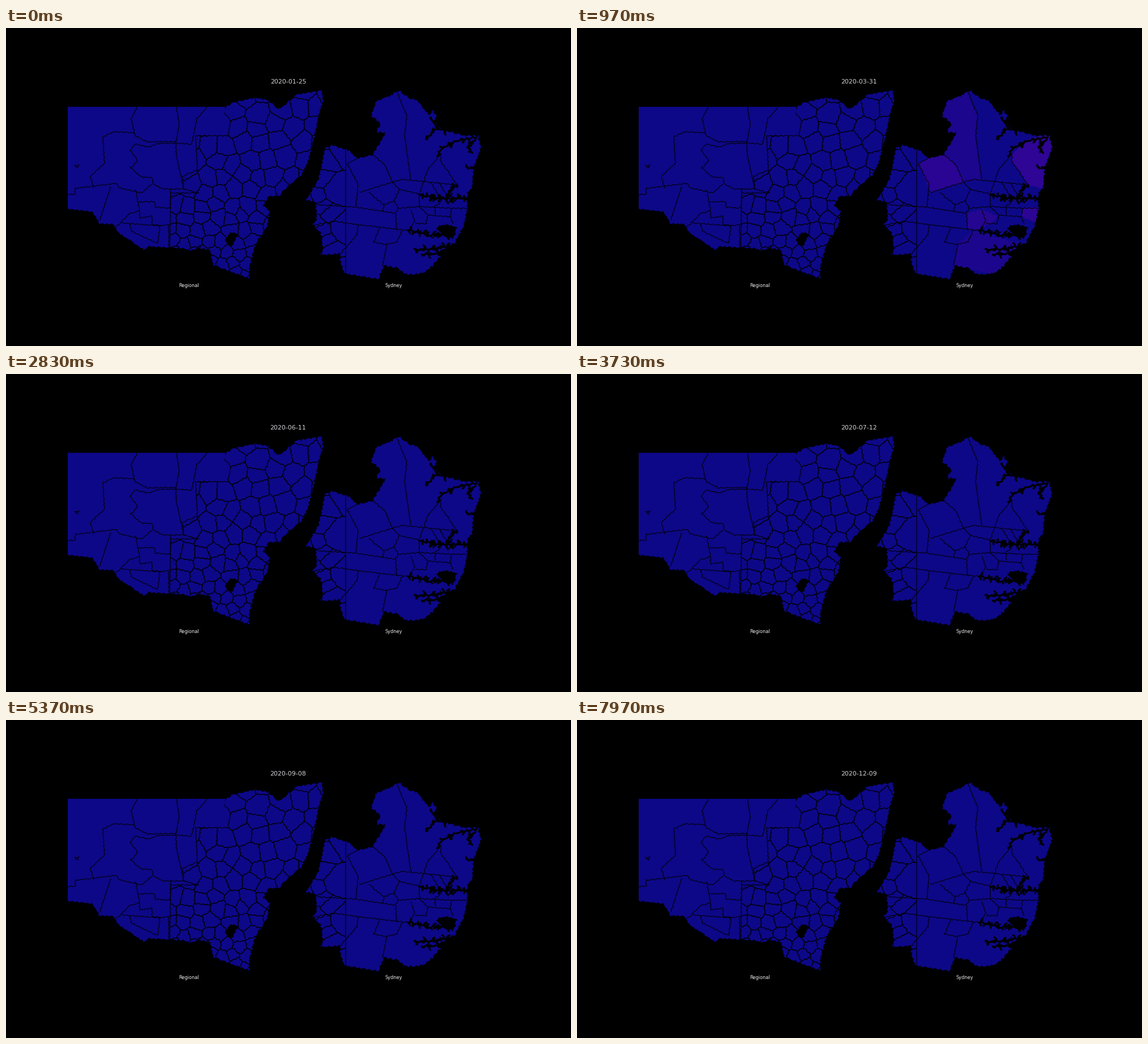
A matplotlib script for the animation above (8000 ms loop, 998 by 561 pixels).

```python
import numpy as np
import matplotlib.pyplot as plt
from matplotlib.animation import FuncAnimation
from matplotlib.collections import LineCollection
from matplotlib.patches import Polygon

W, H, DPI = 998, 561, 128
FRAMES, LOOP_MS = 240, 8000
PX = 72 / DPI
plasma = plt.colormaps["plasma"]
rng = np.random.default_rng(7)

fig = plt.figure(figsize=(W / DPI, H / DPI), dpi=DPI, facecolor="black")
ax = fig.add_axes([0, 0, 1, 1])
ax.set(xlim=(0, W), ylim=(H, 0))
ax.axis("off")


def points(coords):
    return np.array(coords, float).reshape(-1, 2)


def wobble(p, amp):
    """Shift points by a fixed ripple, so shared edges stay shared."""
    x, y = p.T
    dx = np.sin(0.8 * y + 2 * np.sin(0.23 * x)) + 0.6 * np.sin(1.7 * y + x)
    dy = np.sin(0.7 * x + 2 * np.sin(0.29 * y)) + 0.6 * np.sin(1.9 * x - y)
    return p + amp * np.column_stack([dx, dy])


def rough(pts, amp=0.7):
    """Roughen a polyline, leaving long axis-aligned edges straight."""
    out = []
    for a, b in zip(pts[:-1], pts[1:]):
        size = np.hypot(*(b - a))
        t = np.linspace(0, 1, int(size / 2) + 2)[:, None]
        seg = a + (b - a) * t
        straight = size > 100 and 0 in b - a
        out.append(seg if straight else wobble(seg, amp))
    return np.vstack(out)


def close(pts):
    return np.vstack([pts, pts[:1]])


def area(*coords, color=plasma(0.0), amp=0.9, z=1):
    shape = rough(close(points(coords)), amp)
    return ax.add_patch(Polygon(shape, fc=color, ec="none", zorder=z))


def strokes(lines, width=1.05, z=3):
    return ax.add_collection(LineCollection(lines, colors="black", zorder=z,
                                            linewidths=width * PX))


borders = []


def border(*coords):
    borders.append(rough(points(coords)))


def inlet(spurs, reach, *coords):
    """Black waterway with ragged side arms."""
    spine = rough(points(coords), 1.3)
    lines = [spine]
    for p in rng.choice(spine, spurs):
        side = reach * rng.choice([-1, 1])
        end = p + [rng.normal(0, reach / 2), side * rng.uniform(0.5, 1.2)]
        lines.append(rough(np.array([p, end]), 1.2))
    strokes(lines, 3, 4)


def voronoi(seeds):
    """Cell of each seed: a box cut by the bisector to every near neighbour."""
    for s in seeds:
        cell = s + 60 * points([-1, -1, 1, -1, 1, 1, -1, 1])
        for q in seeds:
            n = q - s
            if not 0 < np.hypot(*n) < 110:
                continue
            d = (cell - (s + q) / 2) @ n
            cut = []
            for i, a in enumerate(cell):
                j = (i + 1) % len(cell)
                if d[i] <= 0:
                    cut.append(a)
                if d[i] * d[j] < 0:
                    cut.append(a + (cell[j] - a) * d[i] / (d[i] - d[j]))
            cell = np.array(cut)
        yield cell


# ---- Left map
left = area(
    109, 139, 389, 139, 403, 131, 440, 123, 462, 127, 482, 143, 505, 126, 512, 118,
    558, 110, 560, 128, 553, 152, 541, 208, 533, 236, 522, 259, 490, 286, 484, 296,
    463, 297, 454, 314, 466, 323, 461, 350, 440, 384, 430, 420, 430, 442, 366, 418,
    361, 392, 340, 388, 326, 393, 315, 389, 251, 385, 243, 391, 225, 378, 198, 361,
    190, 346, 165, 345, 152, 324, 109, 319)
area(397, 360, 409, 363, 401, 382, 395, 386, 387, 375, color="black", z=4)

border(232, 139, 221, 160, 228, 190, 250, 201, 300, 200)
border(228, 185, 190, 183, 171, 192, 174, 238, 149, 262, 155, 283)
border(300, 203, 268, 204, 252, 210, 228, 205, 219, 215, 233, 234, 220, 247, 240, 263,
       258, 264, 260, 275, 277, 284, 314, 284, 301, 225, 300, 203)
border(301, 139, 306, 170, 300, 203, 328, 205, 337, 160, 356, 139)
border(109, 294, 122, 293, 122, 283, 195, 274, 200, 282, 240, 291, 258, 275)
border(185, 280, 166, 338)
border(229, 286, 236, 322, 218, 328, 195, 350)
border(236, 322, 236, 335, 258, 332, 258, 347, 273, 348)
border(234, 307, 262, 306, 264, 316, 290, 318, 291, 284)
border(205, 344, 272, 349, 268, 380, 222, 359, 218, 345)
border(272, 349, 287, 347, 288, 386)
border(121, 243, 129, 242, 126, 247, 121, 243)

# Small districts of the east: cells shrink towards the south.
seeds, y = [], 112
while y < 450:
    step = 39 - 0.06 * (y - 112)
    row = np.arange(270 + rng.uniform(0, step), 590, step)
    seeds += [(x, y) + rng.uniform(-0.33, 0.33, 2) * step for x in row]
    y += step * 0.85
east = points([389, 100, 600, 100, 600, 450, 288, 450, 291, 291, 340, 291, 314, 284,
               312, 262, 338, 250, 335, 190, 392, 190, 397, 163, 386, 150])
cells = strokes([rough(close(c)) for c in voronoi(np.array(seeds))])
zone = Polygon(rough(east), fc="none", ec="none")
ax.add_patch(zone)
cells.set_clip_path(zone)
borders.append(rough(east))

# ---- Right map
right = area(
    693, 110, 712, 124, 726, 128, 748, 154, 754, 146, 763, 160, 758, 165, 769, 179,
    808, 190, 834, 190, 839, 210, 826, 246, 823, 283, 815, 290, 815, 318, 808, 350,
    792, 380, 757, 398, 768, 403, 748, 425, 735, 433, 708, 435, 690, 423, 668, 419,
    658, 443, 598, 433, 590, 410, 591, 398, 555, 401, 560, 390, 555, 360, 541, 347,
    549, 338, 547, 307, 530, 303, 552, 268, 564, 212, 575, 206, 605, 216, 620, 230,
    648, 224, 671, 184, 654, 184, 662, 168, 645, 155, 655, 128, 680, 119, amp=1.1)

border(691, 113, 708, 155, 704, 190, 715, 267)
border(620, 230, 603, 240, 622, 275, 618, 316)
border(648, 224, 668, 240, 683, 272, 625, 290)
border(683, 272, 700, 267, 797, 277)
border(738, 270, 745, 250, 768, 222, 768, 235, 797, 277)
border(550, 312, 618, 316, 688, 327, 690, 355)
border(545, 347, 580, 341, 622, 347, 708, 357)
border(622, 347, 620, 365, 591, 398)
border(660, 353, 650, 378, 673, 382, 665, 419)
border(673, 381, 690, 378, 700, 357)
border(640, 290, 668, 312, 665, 324)
border(668, 312, 685, 305, 693, 318, 688, 327)
border(683, 272, 695, 285, 685, 305)
border(695, 285, 730, 293, 730, 315, 693, 318)
border(738, 270, 730, 293)
border(715, 320, 722, 340, 712, 357)
border(730, 315, 745, 330, 742, 345, 722, 345)
border(745, 330, 785, 333, 787, 318, 815, 318)
border(758, 329, 758, 315, 770, 304)
border(730, 315, 787, 318)
border(785, 333, 790, 346)
border(750, 272, 765, 298)
border(765, 272, 780, 298)
strokes(borders)

inlet(10, 6, 748, 158, 763, 175, 744, 194)
inlet(5, 5, 759, 162, 776, 184)
inlet(9, 6, 763, 224, 768, 213, 800, 198, 833, 192)
inlet(7, 6, 831, 194, 815, 209, 823, 222)
inlet(3, 4, 812, 247, 828, 246)
inlet(34, 7, 729, 293, 760, 301, 818, 300)
inlet(7, 6, 775, 300, 796, 276)
inlet(22, 6, 708, 356, 750, 366, 792, 364)
inlet(15, 6, 722, 391, 750, 391, 793, 382)
inlet(4, 4, 734, 400, 758, 398)
area(761, 353, 775, 346, 796, 352, 792, 367, 780, 373, color="black", amp=1.3, z=4)


# ---- Districts that brighten with daily counts
def district(level, day, spread, *coords):
    patch = area(*coords, amp=0.7, z=2)
    patch.set_clip_path(right.get_path(), right.get_transform())
    noise = rng.uniform(0.8, 1.1, FRAMES)
    curve = level * noise * np.exp(-((np.arange(FRAMES) - day) / spread) ** 2)
    return patch, curve


districts = [
    district(0.072, 25, 9, 768, 222, 800, 195, 845, 185, 830, 285, 797, 277, 768, 235),
    district(0.055, 26, 9, 620, 230, 648, 224, 668, 240, 683, 272, 625, 290, 603, 240),
    district(0.03, 26, 9, 648, 224, 640, 110, 691, 113, 708, 155, 704, 190, 715, 267,
             683, 272, 668, 240),
    district(0.045, 27, 8, 688, 327, 715, 320, 745, 333, 712, 357, 690, 355),
    district(0.03, 26, 8, 673, 381, 700, 357, 790, 383, 760, 440, 665, 419),
    district(0.065, 25, 8, 787, 318, 825, 315, 815, 345, 785, 333),
    district(0.035, 193, 2, 541, 347, 580, 341, 622, 347, 620, 365, 591, 398, 550, 406),
]

style = dict(ha="center", va="baseline", family="DejaVu Sans", zorder=5)
title = ax.text(498.5, 98, "", color="#d4d4d8", fontsize=11 * PX, **style)
for x, name in ((323.5, "Regional"), (684.3, "Sydney")):
    ax.text(x, 456.5, name, color="#e8e8e8", fontsize=8.2 * PX, **style)

# Days without reports are skipped, so the calendar advances unevenly.
STEPS = [0, 1, 29, 46, 85, 133, 193, 239]
DAYS = [0, 36, 66, 85, 139, 194, 265, 319]
START = np.datetime64("2020-01-25")


def update(i):
    title.set_text(str(START + int(np.interp(i, STEPS, DAYS) + 0.5)))
    for patch, curve in districts:
        patch.set_visible(curve[i] > 0.004)
        patch.set_facecolor(plasma(float(curve[i])))
    return [title, *(p for p, _ in districts)]


anim = FuncAnimation(fig, update, frames=FRAMES, interval=LOOP_MS / FRAMES,
                     repeat=True, repeat_delay=0, blit=False)
plt.show()
```
